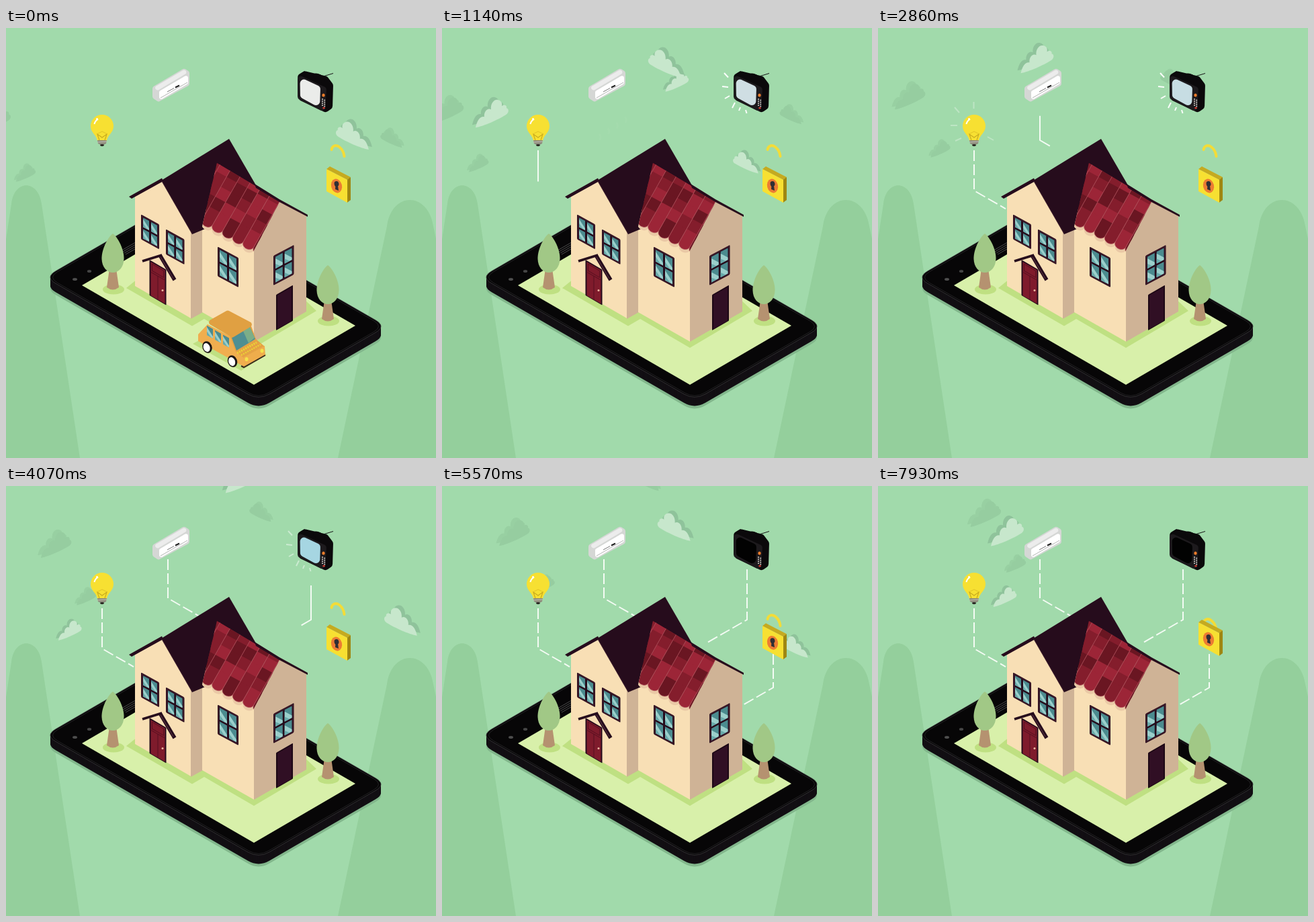
These frames come from a looping animation (640 by 640 pixels, 8000 ms). An HTML page with a canvas:

```html
<!DOCTYPE html>
<html lang="en">
<head>
<meta charset="utf-8">
<title>Smart home</title>
<style>
html, body { margin: 0; width: 100%; height: 100%; overflow: hidden; background: #a1daab; }
canvas { display: block; width: 100vw; height: 100vh; }
</style>
</head>
<body>
<canvas id="stage" width="640" height="640"></canvas>
<script>
const c = document.getElementById('stage').getContext('2d');
const LOOP = 8000, ISO = 0.577;
const DARK = '#260c1c', CREAM = '#f8dfb5', TAN = '#cfb396', GRASS = '#d8f0aa', GRASS_DARK = '#bfe082';
const GOLD = '#f7e032';

const clamp = v => Math.max(0, Math.min(1, v));
const ramp = (t, a, b) => clamp((t - a) / (b - a));
const ease = p => p * p * (3 - 2 * p);
const mix = (a, b, p) => a.map((v, i) => v + (b[i] - v) * p);
const rgb = a => `rgb(${a.map(Math.round)})`;

function trace(pts) {
  c.beginPath();
  for (let i = 0; i < pts.length; i += 2) c.lineTo(pts[i], pts[i + 1]);
}
function poly(color, ...pts) {
  trace(pts);
  c.closePath();
  c.fillStyle = color;
  c.fill();
}
function line(color, width, ...pts) {
  trace(pts);
  c.strokeStyle = color;
  c.lineWidth = width;
  c.stroke();
}
function oval(color, x, y, rx, ry = rx, turn = 0) {
  c.beginPath();
  c.ellipse(x, y, rx, ry, turn, 0, 7);
  c.fillStyle = color;
  c.fill();
}
// polygon with softened corners
function soft(color, r, ...pts) {
  const n = pts.length;
  c.beginPath();
  c.moveTo((pts[0] + pts[n - 2]) / 2, (pts[1] + pts[n - 1]) / 2);
  for (let i = 0; i < n; i += 2) c.arcTo(pts[i], pts[i + 1], pts[(i + 2) % n], pts[(i + 3) % n], r);
  c.closePath();
  c.fillStyle = color;
  c.fill();
}
function shape(color, d) {
  c.fillStyle = color;
  c.fill(new Path2D(d));
}
function at(x, y, draw) {
  c.save();
  c.translate(x, y);
  draw();
  c.restore();
}
// wall-aligned drawing, k is the slope of the wall
function panel(x, y, k, draw) {
  c.save();
  c.transform(1, k, 0, 1, x, y);
  draw();
  c.restore();
}

// ---- sky ----
const puff = new Path2D('M-22 23C-20 14-16 6-9 7C-10-1-4-7 1-4C0-13 6-20 12-18C17-17 18-12 17-9C21-12 25-10 24-6C28-5 28 1 23 4C12 11-10 21-22 23Z');

// every cloud is at (x, y) at each of its times and drifts by (vx, vy) per second
const clouds = [
  { x: -18, y: 134, vx: 22.2, vy: -11.9, scale: .93, faint: true, times: [0] },
  { x: 28, y: 215, vx: 22.2, vy: -12.6, scale: .6, faint: true, times: [0] },
  { x: 575, y: 163, vx: -47.9, vy: -30.7, scale: .66, faint: true, times: [0] },
  { x: 18, y: 152, vx: 94.5, vy: -47, scale: 1, times: [570, 6110] },
  { x: 134, y: 192, vx: 375, vy: -199, scale: .71, times: [570, 4179, 7789] },
  { x: 564, y: 257, vx: -193, vy: -102, scale: .77, times: [570, 5383], fades: true },
  { x: 518, y: 158, vx: -161.5, vy: -94, scale: 1, times: [0, 4516] }
];
function cloud(k, seconds) {
  const x = k.x + k.vx * seconds, y = k.y + k.vy * seconds;
  if (x < -40 || x > 680 || y < -40) return;
  at(x, y, () => {
    if (k.fades) c.globalAlpha = ramp(x, 130, 180);
    c.scale(Math.sign(k.vx) * k.scale, k.scale);
    c.translate(-5, -4);
    c.fillStyle = k.faint ? '#98d0a2' : '#8fc39b';
    c.fill(puff);
    c.translate(5, 4);
    c.fillStyle = k.faint ? '#96cda0' : '#c7e7cc';
    c.fill(puff);
  });
}
function hills() {
  shape('#94cf9c', 'M-50 640L8 262C12 225 48 225 53 262L110 640Z');
  shape('#94cf9c', 'M494 640L567 295C574 243 628 243 636 295L710 640Z');
}

// ---- links from the devices to the house ----
// a drop of the given height, then a slanted run of the given width
function link(t, t0, x, y, drop, run) {
  const bend = y + drop, slant = Math.abs(run) * ISO;
  const total = drop + Math.hypot(run, slant);
  const part = (from, to) => {
    if (to <= from) return;
    c.setLineDash([0, from * total, (to - from) * total, 999]);
    line('#f4fbf4', 2, x, y, x, bend, x + run, bend + slant);
    c.setLineDash([]);
  };
  part(ramp(t, t0 + 200, t0 + 620), ramp(t, t0, t0 + 420));
  const shown = ramp(t, t0 + 420, t0 + 820) * total;
  for (let s = 0; s < shown; s += 21) part(s / total, Math.min(s + 16, shown) / total);
}
function links(t) {
  link(t, 970, 143, 182, 60, 47);
  link(t, 2580, 241, 109, 58, 47);
  link(t, 3800, 454, 124, 75, -58);
  link(t, 4600, 493, 250, 50, -47);
}

// rays grow outwards from their first point
function rays(grow, alpha, list) {
  if (grow <= 0 || alpha <= 0) return;
  c.globalAlpha = alpha;
  for (const [x, y, dx, dy] of list) line('#fff', 2, x, y, x + dx * grow, y + dy * grow);
  c.globalAlpha = 1;
}

// ---- devices ----
function bulb(t) {
  rays(ramp(t, 1580, 1780), ramp(t, 2950, 2650),
    [[121, 126, -7, -8], [142.5, 120, 0, -10], [118, 145, -10, 0], [124, 164, -9, 4], [163, 162, 9, 5]]);
  shape(GOLD, 'M126 146A17 17 0 1 1 160 146C160 156 151 159 150 168L136 168C135 159 126 156 126 146Z');
  line('#c9ac1e', 1.2, 139, 167, 136, 158, 143, 163, 150, 158, 147, 167);
  line('#e1c326', 1, 135, 158, 143, 154, 151, 158);
  shape('#8f8d7e', 'M136 167L150 167L149 172Q143 176 137 172Z');
  line('#c4c1b2', 1, 136, 170, 150, 169);
  oval('#26241f', 143, 174.5, 3, 1.4);
  c.beginPath();
  c.arc(143, 146, 12, 3.4, 4.2);
  c.strokeStyle = '#fff';
  c.lineWidth = 2;
  c.stroke();
  oval('#fff', 135.5, 135.5, 1.4);
}
function cooler(t) {
  soft('#d5d7d5', 4, 218, 88, 265, 60, 273, 65, 273, 85, 227, 110, 218, 104);
  soft('#ececec', 3, 219, 89, 265, 62, 271, 66, 226, 93);
  soft('#fff', 3, 228, 94, 271, 69, 271, 83, 228, 108);
  line('#b5b5b5', 1, 230, 104, 270, 81);
  line('#777', 1, 240, 95, 250, 89.5);
  line('#222', 2, 252, 88.5, 258, 85.5);
  const p = ramp(t, 150, 1150);
  if (p <= 0 || p >= 1) return;
  c.globalAlpha = Math.min(1, p * 5, (1 - p) * 4);
  for (let i = 0; i < 4; i++) at(235 + i * 12.7, 148.5 - i * 8.5 + (p - .42) * 24, () => {
    c.beginPath();
    c.moveTo(-1, -4.5);
    c.quadraticCurveTo(3, 0, -.5, 4.5);
    c.strokeStyle = '#fff';
    c.lineWidth = 3;
    c.stroke();
  });
  c.globalAlpha = 1;
}
function television(t) {
  rays(ramp(t, 100, 600), .95 - .5 * ramp(t, 3300, 3900) - .45 * ramp(t, 4150, 4400),
    [[426, 73.5, -6, -6.5], [426, 88, -9, -1], [428, 101, -7, 4], [436, 111, -4, 8], [444, 118, -2, 5], [452, 122, 1.5, 5]]);
  line('#151315', 1, 469, 73, 487, 67.5);
  line('#151315', 2, 443, 65, 448, 67);
  soft('#0b090b', 6, 434, 70, 444, 64, 478, 72, 487, 84, 486, 119, 476, 126, 436, 107);
  oval('#0b090b', 466, 74, 10, 5, .5);
  soft('#1d1a1d', 5, 434, 69, 477, 89, 475, 126, 434, 105);
  let color = mix([235, 236, 234], [207, 222, 227], ramp(t, 70, 550));
  color = mix(color, [166, 214, 226], ramp(t, 2600, 4000));
  color = mix(color, [2, 2, 2], ramp(t, 4300, 4500));
  soft(rgb(color), 6, 437.5, 73, 468, 87.5, 467, 119, 438, 103);
  oval('#ef7c2b', 472.5, 100, 2.2, 2.6);
  for (let i = 0; i < 8; i++) oval('#d8d4d0', 471 + i % 2 * 3.2, 106 + (i >> 1) * 3 + i % 2 * 1.4, 1);
  oval('#d43a2f', 473, 119, 1.8, 1.2);
}
function padlock(t) {
  at(0, 23 * ease(ramp(t, 5350, 5680)), () => {
    c.lineCap = 'round';
    c.strokeStyle = '#f3dc38';
    c.lineWidth = 4;
    c.stroke(new Path2D('M484.5 181C486 174 492 174 496 177C501 181 503 186 503.5 191'));
  });
  at(0, -7 * ease(ramp(t, 5480, 5760)), () => {
    poly('#c5aa20', 477, 210, 482, 206, 513, 222, 508, 226);
    poly('#9f8712', 507.5, 226, 513, 222, 513, 256, 507.5, 260);
    poly(GOLD, 477, 210, 508, 226, 508, 260, 477, 243);
    oval('#ec7c33', 492, 235, 8, 10.5, -.25);
    oval('#2f2f35', 492, 232, 3.4, 4, -.2);
    poly('#2f2f35', 490.5, 234, 494, 235, 495, 242, 490, 240);
  });
}

// ---- tablet and garden ----
const turns = [[1, -1], [-1, -1], [-1, 1], [1, 1]];
function slab(dy, inset = 0) {
  const d = 16 - inset * .6, side = inset * 1.7;
  const corners = [[58 + side, 371], [376, 554 - inset], [566 - side, 444], [248, 261 + inset]];
  c.beginPath();
  corners.forEach(([x, y], i) => {
    const [ax, ay] = turns[i];
    const [bx, by] = turns[(i + 3) % 4];
    c.lineTo(x + ax * d, y + dy + ay * d * ISO);
    c.quadraticCurveTo(x, y + dy, x + bx * d, y + dy + by * d * ISO);
  });
  c.closePath();
}
const screen = [113, 383, 369, 531, 520, 443, 264, 295];
function tablet() {
  c.fillStyle = '#82b78c';
  slab(17);
  c.fill();
  c.fillStyle = '#120f13';
  for (let y = 13; y > 0; y--) { slab(y); c.fill(); }
  slab(0);
  c.fillStyle = '#070607';
  c.fill();
  c.strokeStyle = '#3c3a3d';
  c.lineWidth = .8;
  c.stroke();
  slab(0, 2.5);
  c.strokeStyle = '#29272a';
  c.stroke();
  for (let i = 0; i < 8; i += 2) line('#4a4a4a', 1, 172 + i, 331 + i, 192 + i, 319.5 + i);
  oval('#4d4d4d', 102.5, 374, 3.5, 2);
  oval('#454545', 124, 362, 3.2, 2);
  poly(GRASS, ...screen);
  poly(GRASS_DARK, 179, 387, 277, 443.5, 295, 433, 369, 476, 462, 421, 440, 400, 200, 370);
}
function tree(x, y) {
  at(x, y, () => {
    oval(GRASS_DARK, 1, 1, 16, 7.5);
    shape('#b59270', 'M-5-30L5-30L9-2Q0 5-9-2Z');
    shape('#a1c886', 'M0-82C8-76 17-58 16.5-44C16-32 9-24 0-24C-9-24-16-32-16.5-44C-17-58-8-76 0-82Z');
  });
}

// ---- house ----
function pane(x, y, w, h) {
  c.fillStyle = '#4b8b8f';
  c.fillRect(x, y, w, h);
  poly('#9bcfcb', x, y + h * .15, x + w, y + h * .8, x + w, y + h, x, y + h);
  poly('#68a9aa', x, y + h * .6, x + w * .7, y + h, x, y + h);
}
function casement(x, y, w, h, k) {
  panel(x, y, k, () => {
    soft(DARK, 1.5, 0, 0, w, 0, w, h, 0, h);
    c.strokeStyle = '#5a2838';
    c.lineWidth = .6;
    c.strokeRect(1.5, 1.5, w - 3, h - 3);
    const pw = (w - 9) / 2, ph = (h - 9) / 2;
    for (let i = 0; i < 4; i++) pane(3 + i % 2 * (pw + 3), 3 + (i >> 1) * (ph + 3), pw, ph);
  });
}
function door(x, y, k, frame, leaf) {
  panel(x, y, k, () => {
    soft(frame, 1, 0, 0, 25, 0, 25, 53, 0, 53);
    c.fillStyle = leaf;
    c.fillRect(2, 2, 21, 50);
  });
}
function tile(i, j, color, edge) {
  c.save();
  c.transform(-15.3, -8.3, 8.4, -14.8, 366, 331);
  c.beginPath();
  c.moveTo(i, j + 1.6);
  c.lineTo(i, j + .35);
  c.bezierCurveTo(i, j - .25, i + 1, j - .25, i + 1, j + .35);
  c.lineTo(i + 1, j + 1.6);
  c.restore();
  c.fillStyle = color;
  c.fill();
  if (edge) {
    c.strokeStyle = edge;
    c.lineWidth = .7;
    c.stroke();
  }
}
function redRoof() {
  c.save();
  trace([314, 201, 408, 257, 368, 333, 368, 345, 292, 320, 292, 295]);
  c.clip();
  at(0, 5, () => { for (let i = 0; i < 6; i++) tile(i, 0, '#eac9a6'); });
  const reds = ['#9c2537', '#6a1622', '#841d2c'];
  for (let j = 6; j >= 0; j--)
    for (let i = -1; i < 8; i++) tile(i, j, reds[(i * 2 + j * 5 + (i * j & 1) + 9) % 3], '#b0525c');
  c.restore();
}
function house() {
  poly(CREAM, 192, 250, 233, 228, 276, 304, 276, 432.5, 192, 384);
  poly(TAN, 275, 304, 293, 294, 293, 423, 275, 433);
  poly(CREAM, 292, 290, 369.5, 322, 369.5, 467, 292, 423);
  poly(TAN, 369, 326, 408, 257, 447, 279, 447, 422, 369, 467);
  poly(DARK, 231, 227, 332, 165, 372, 234, 330, 285, 277, 307);
  poly(DARK, 183, 251, 232, 223.5, 234, 228, 187, 254);
  line('#4a2636', .7, 232, 228, 277, 306);
  redRoof();
  poly(DARK, 370, 232, 407, 255, 449, 278, 449, 281, 407, 259, 372, 238);
  casement(201, 277.5, 27, 37, .55);
  casement(238, 299.5, 27.5, 37.5, .55);
  casement(315, 325.5, 31, 44, .53);
  casement(398, 339, 30.5, 44, -.53);
  door(402, 397, -.57, '#1c0714', '#300f24');
  door(213.5, 345, .58, DARK, '#7f1b2c');
  panel(213.5, 345, .58, () => {
    c.strokeStyle = '#571020';
    c.lineWidth = 1;
    c.strokeRect(4, 4, 17, 10);
    line('#571020', 1, 2, 17, 23, 17);
    line('#571020', 1, 12.5, 17, 12.5, 52);
  });
  oval('#f0b9a2', 233, 390.5, 1.5);
  line(DARK, 3.5, 203, 347, 232, 338);
  line(DARK, 5.5, 229, 338, 251, 375);
  line('#704650', .8, 230, 341, 249, 373);
}

// ---- car ----
function wheel(x, y) {
  oval('#1d1715', x, y, 7, 9, -.35);
  oval('#fff', x - .8, y + .5, 4.8, 6.6, -.35);
}
function track(x, y, len) {
  line('#8aa161', 4.5, x - len, y - len * ISO, x + 8, y + 8 * ISO);
}
function car(t) {
  const run = t / 570, d = 91 * run * run;
  if (d > 190) return;
  c.save();
  trace(screen);
  c.clip();
  c.translate(d, d * ISO);
  if (run > .05) {
    const len = 38 * Math.min(run, 1.2);
    track(287, 469, len);
    track(300, 446, len);
  }
  poly(GRASS_DARK, 278, 470, 300, 458, 388, 486, 350, 510);
  poly('#f0ae4f', 286, 456, 300, 441, 340, 462, 343, 481, 354, 490, 354, 504, 286, 466);
  wheel(299.5, 475);
  wheel(337, 496);
  panel(299, 443, .56, () => { for (let i = 0; i < 3; i++) pane(i * 12, 0, 9, 14); });
  poly('#e5a244', 333, 458, 364, 441, 372, 463, 385, 474, 354, 491, 342, 482);
  poly('#4f8f92', 336, 461, 363, 445, 371, 463, 343, 480);
  poly('#7cae88', 353, 451, 363, 445, 370, 461, 361, 469);
  soft('#e0a042', 4, 298, 438, 330, 420, 370, 441, 337, 461);
  poly('#efad4c', 354, 490, 385, 473, 386, 487, 354, 504);
  c.setLineDash([2, 1.5]);
  line('#ecd734', 3, 344, 484, 373, 468);
  line('#ecd734', 2, 350, 487, 379, 471);
  c.setLineDash([]);
  oval('#f5e24a', 358, 493, 2.5, 3);
  oval('#f5e24a', 381, 480.5, 2.5, 3);
  line('#3a2a1c', 2, 350, 503, 354, 505, 386, 487);
  c.restore();
}

function draw(t) {
  c.fillStyle = '#a1daab';
  c.fillRect(0, 0, 640, 640);
  hills();
  for (const k of clouds) for (const time of k.times) cloud(k, (t - time) / 1000);
  links(t);
  bulb(t);
  cooler(t);
  television(t);
  padlock(t);
  tablet();
  house();
  tree(159, 388);
  tree(479, 435);
  car(t);
}

const start = performance.now();
function frame() {
  draw((performance.now() - start) % LOOP);
  requestAnimationFrame(frame);
}
frame();
</script>
</body>
</html>
```
